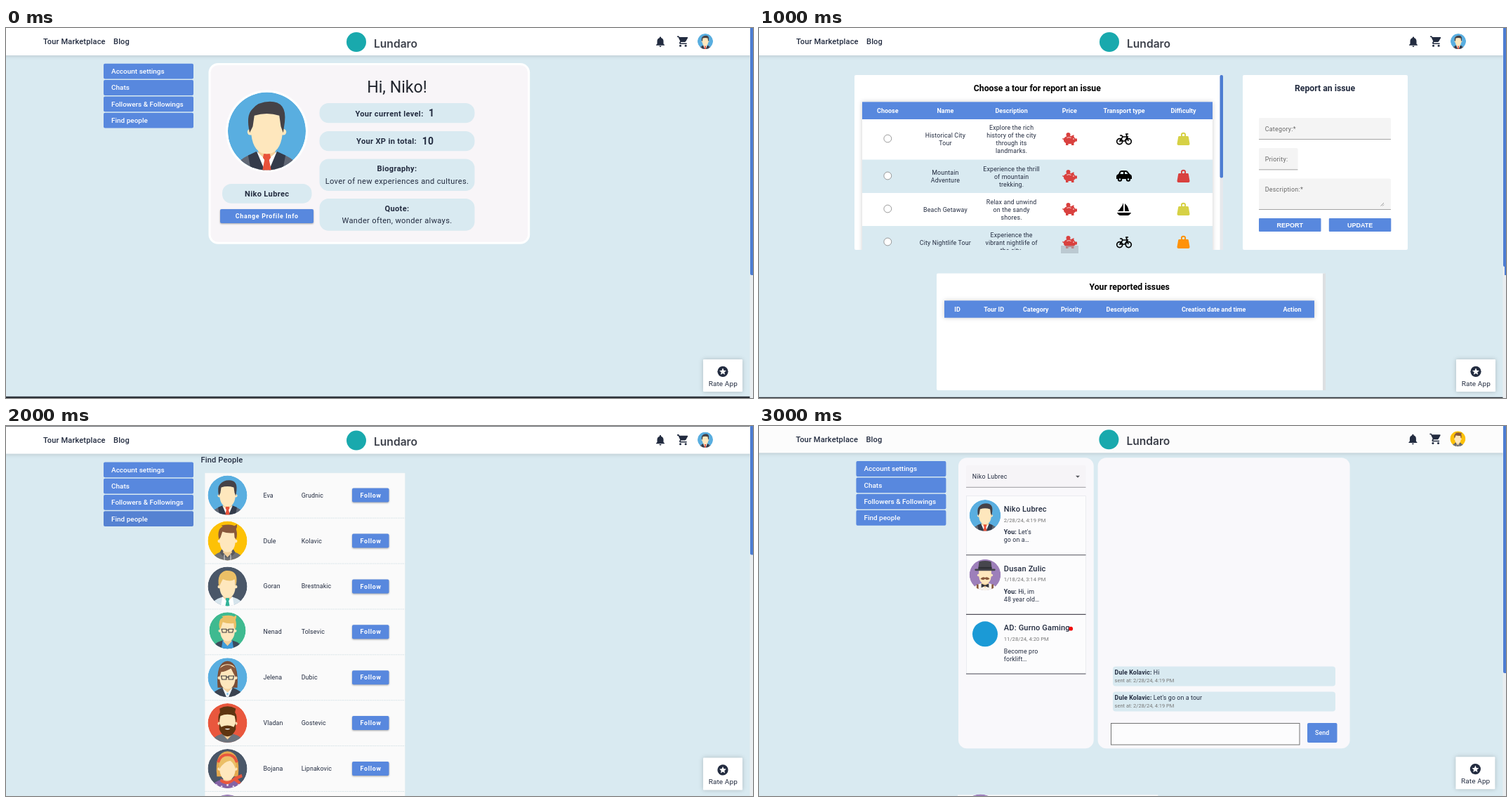
An HTML page that plays this animation: 1064 by 527 pixels, repeating every 4000 ms.

```html
<!DOCTYPE html>
<html lang="en">
<head>
<meta charset="utf-8">
<title>Tour app</title>
<style>
html, body { margin: 0; width: 100%; height: 100%; overflow: hidden; background: #d9eaf1; }
svg { display: block; width: 1064px; height: 527px; font-family: Roboto, sans-serif; }
text { white-space: pre; }
.mid { text-anchor: middle; }
.soft { filter: drop-shadow(0 0 3px #0003); }
.low { filter: drop-shadow(0 1px 1px #0005); }
</style>
</head>
<body>
<svg id="stage" viewBox="0 0 1064 527"></svg>
<script>
const INK = '#232c40', BLUE = '#5888de', PALE = '#d9eaf1', SKIN = '#fee7bd', RED = '#d9413f';
const ME = 'Niko Lubrec', PAL = 'Dule Kolavic';

const rect = (x, y, x2, y2, fill, rx = 0, more = '') =>
  `<rect x="${x}" y="${y}" width="${x2 - x}" height="${y2 - y}" rx="${rx}" fill="${fill}" ${more}/>`;
const circle = (x, y, r, fill, more = '') => `<circle cx="${x}" cy="${y}" r="${r}" fill="${fill}" ${more}/>`;
const path = (d, fill, more = '') => `<path d="${d}" fill="${fill}" ${more}/>`;
const line = (d, stroke, width = 1, more = '') => path(d, 'none', `stroke="${stroke}" stroke-width="${width}" ${more}`);
const move = (x, y, s, body) => `<g transform="translate(${x} ${y}) scale(${s})">${body}</g>`;
const text = (x, y, s, size = 8.86, weight = 400, fill = INK, ls = 0.0125, more = '') =>
  `<text x="${x}" y="${y}" font-size="${size}" font-weight="${weight}" fill="${fill}" letter-spacing="${ls * size}" ${more}>${s}</text>`;
const mid = (x, y, s, size, weight, fill, ls, more = '') => text(x, y, s, size, weight, fill, ls, 'class="mid" ' + more);
const lines = (x, y, list) => list.map((s, i) => mid(x, y + i * 11, s, 8.86, 400, INK, 0.0178)).join('');

// Avatars, drawn in a disc of radius 50
const HEAD = 'M-20-16Q-20-34 0-34T20-16V4Q17 29 0 29T-20 4Z';
const body = fill => path('M-42 52Q-40 35-13 27L0 31 13 27Q40 35 42 52Z', fill);
const face = circle(-21, 1, 4, SKIN) + circle(21, 1, 4, SKIN) + path(HEAD, SKIN);
const neck = path('M-11 18H11V30L0 42-11 30Z', '#f3cf99');
const shirt = fill => path('M-13 26L0 38 13 26 17 52H-17Z', fill);
const tie = fill => path('M-4 29H4L5 34 3 37 6 52H-6L-3 37-5 34Z', fill);
const lapels = fill => path('M-13 26L-2 52H-20L-24 31ZM13 26L2 52H20L24 31Z', fill);
const glasses = line('M-16-4H-3V5H-14ZM16-4H3V5H14ZM-3-1H3', '#3c3c40', 2);
const quiff = fill => path('M-22-4Q-27-30-12-36L-16-39Q8-44 18-38L24-42Q25-34 22-30 26-16 22-4L18-8 17-20Q0-18-13-23L-18-8Z', fill);

const people = [
  ['#59aee0', body('#616774') + neck + shirt('#fff') + lapels('#343b4a') + tie('#e9523a') + face +
    path('M-22 2Q-27-20-19-28-11-38 4-38 26-38 23-12L21 2 18-6 16-20Q0-25-16-20L-18-6Z', '#454247')],
  ['#fdc106', body('#717276') + path('M-20 30Q0 56 20 30L15 22H-15Z', '#595a5f') + neck + face +
    quiff('#88583b') + line('M-8 35V49M8 35V49', '#ddd', 2)],
  ['#4a5768', body('#d5e4ec') + neck + shirt('#fff') + tie('#32b398') + face +
    path('M-22 0Q-28-34-4-40 26-42 23-12L21 0 18-18Q8-10-12-18L-18-6Z', '#ebbf66')],
  ['#3fba90', body('#3e4b5d') + shirt('#409cda') + neck + face + quiff('#ebbf66') + glasses],
  ['#59aee0', path('M-25 26Q-30-40 0-42 30-40 25 26Z', '#7a4d35') + body('#3c4350') + neck + shirt('#eef4f8') + lapels('#3c4350') +
    face + path('M-21 0V-22Q0-42 21-22V0Q16-8 9-23-6-14-16-14Z', '#88583b') + glasses + circle(0, 42, 2, '#59aee0')],
  ['#e9573d', body('#6c737c') + neck + face + path('M-22 0Q-26-18-19-27L-20-37Q0-48 21-37L19-27Q26-18 22 0L18-18Q0-26-18-18Z', '#5f3511') +
    path('M-21 0L-16 10Q0 2 16 10L21 0V16Q14 34 0 34T-21 16Z', '#5f3511') + path('M-7 14H7Q0 20-7 14', '#fff')],
  ['#4a5768', path('M-27 20Q-34-42 0-44 34-42 27 20Z', '#e3a94e') + body('#8562a5') + neck + face +
    path('M-21 2Q-26-30 0-32 26-30 21 2 16-14 7-20-10-18-21 2', '#ebbf66') + line('M-24-16Q-18-35 0-35T24-16', '#e9573d', 7) +
    path('M-17 25Q0 40 17 22L36 14 38 22 26 27 35 36 28 39 17 31Q0 47-19 33Z', '#e9573d') +
    [-28, -15, 0, 15, 28].map((x, i) => circle(x, 42 + i % 2 * 4, 2.5, '#e9dff0')).join('')],
  ['#9d7fba', body('#f6f2ea') + neck + face + line('M-24 30V52M24 30V52', '#8a5a3c', 6) + path('M-22-18L-19-42Q0-48 19-42L22-18Z', '#46464d') +
    rect(-21, -25, 21, -18, '#2f3036') + rect(-33, -19, 33, -13, '#46464d', 3) +
    path('M0 9Q-8 4-15 13-5 19 0 13 5 19 15 13 8 4 0 9', '#8a5a3c') + path('M-12 28L0 33 12 28V41L0 36-12 41Z', '#35363d')]
];
const avatar = (k, x, y, r) => move(x, y, r / 50, `<g clip-path="url(#disc)">${circle(0, 0, 50, people[k][0]) + people[k][1]}</g>`);

// Icons
const BELL = 'M12 22c1.1 0 2-.9 2-2h-4c0 1.1.9 2 2 2zm6-6v-5c0-3.1-1.6-5.6-4.5-6.3V4c0-.8-.7-1.5-1.5-1.5s-1.5.7-1.5 1.5v.7C7.6 5.4 6 7.9 6 11v5l-2 2v1h16v-1z';
const CART = 'M1 2V4H3L6.6 11.6 5.2 14Q4.5 17 7 17H19V15H7.4L8.1 13H15.5Q16.8 13 17.3 12L21 5.4Q21.4 4 20 4H5.2L4.3 2Z';
const STAR = 'M0-5L1.5-1.6 5-1.3 2.3 1 3.1 4.5 0 2.6-3.1 4.5-2.3 1-5-1.3-1.5-1.6Z';

const pig = circle(-2, -6, 3, RED) +
  path('M-8-1Q-5-5 2-4L6-6V-3Q7-2 8-.5H10.5V3.5H8.5Q7 5 6 5.6V9H2.5V7H-2V9H-5.500V6Q-9 4-8.500 1Q-11 1-10-1.500Q-9.500 0-8-1Z', RED) +
  line('M-4-1.6Q-1-3 2-1.600', '#fff', 0.8) + circle(5.5, 0, 0.8, '#fff');
const rides = {
  bike: line('M-6 3L-2-3H5L1 3ZM-6 3H1M-3-5H-6M-2-3L-3.500-5M6 3L3-7H6', '#000', 1.7) +
    circle(-6.3, 3.6, 4, 'none', 'stroke="#000" stroke-width="1.700"') + circle(6.3, 3.6, 4, 'none', 'stroke="#000" stroke-width="1.700"'),
  car: path('M-11 0Q-11-2-8-3L-6-7Q-5-8-3-8H2Q4-8 5-7L8-3Q11-2 11 1V4H-11Z', '#000') + circle(-6, 4.5, 3.2, '#000') +
    circle(6, 4.5, 3.2, '#000') + path('M-5.500-3L-4.500-6H-1V-3ZM1-3V-6H3L5.500-3Z', PALE) + circle(-6, 4.5, 1.2, PALE) + circle(6, 4.5, 1.2, PALE),
  boat: path('M-1-9V3H-9Q-3-3-1-9ZM1-8Q6-4 7 3H1ZM-10 5H10Q8 9 5 9H-5Q-8 9-10 5Z', '#000')
};
const weight = fill => path('M-6-4H6Q7-4 7.300-3L9 7Q9 9 7 9H-7Q-9 9-9 7L-7.300-3Q-7-4-6-4Z', fill) +
  circle(0, -5.5, 2.7, 'none', `stroke="${fill}" stroke-width="1.900"`);

// Shared page parts
const header = (who, fill = '#fff') => rect(-5, -5, 1070, 39, fill, 0, 'class="soft"') +
  text(53, 23.4, 'Tour Marketplace', 11.08, 500) + text(153, 23.4, 'Blog', 11.08, 500) +
  circle(499, 20, 14, '#19a9ad') +
  text(524, 27.5, 'Lundaro', 15.6, 600, '#3b3f49', 0, 'font-family="Inter, sans-serif"') +
  move(923, 10.5, 0.75, path(BELL, INK)) +
  move(955.2, 10, 0.76, path(CART, INK) + circle(7, 20, 2, INK) + circle(17, 20, 2, INK)) + avatar(who, 996, 19, 11);
const menu = (active = -1) => ['Account settings', 'Chats', 'Followers &amp; Followings', 'Find people'].map((s, i) => {
  const y = 50.8 + i * 23.3;
  return rect(139, y, 267, y + 21.8, i === active ? '#5582d2' : BLUE, 2) + text(150, y + 14.3, s, 9.97, 500, '#fff', 0);
}).join('');
const rate = rect(993, 472, 1049, 518, '#fff', 1, 'class="soft"') + circle(1021, 489.3, 7.6, INK) + move(1021, 489.3, 1, path(STAR, '#fff')) +
  mid(1021.3, 509.8, 'Rate App', 9.97);
const bar = end => rect(1059.5, 0, 1064, 527, '#e9edf0') + rect(1060, -4, 1066, end, '#4d7dd2', 2);
const button = (x, y, x2, y2, s) => rect(x, y, x2, y2, BLUE, 2, 'class="low"') +
  mid((x + x2) / 2 + 0.3, (y + y2) / 2 + 3.1, s, 8.86, 700, '#fff', 0.078);

function profile() {
  const pill = (y, y2) => rect(446.5, y, 667.5, y2, PALE, 13);
  const bold = (x, y, s) => mid(x, y, s, 11.08, 700, INK, 0.03);
  const plain = (y, s) => mid(557, y, s, 11.08, 400, INK, 0.03125);
  return header(0) + menu() +
    rect(290, 51.5, 744.7, 306.3, '#f8f5f8', 12, 'stroke="#fff" stroke-width="3"') +
    circle(371.5, 147, 58.5, '#fff') + avatar(0, 371.5, 147, 55.5) +
    rect(308, 222, 435.5, 249.7, PALE, 13) + bold(371.7, 240, ME) + button(305, 258, 438, 278, 'Change Profile Info') +
    mid(557, 92, 'Hi, Niko!', 23.2, 400, '#20242c', 0) +
    pill(107, 135.3) + bold(546, 125.5, 'Your current level:') + mid(606, 126, '1', 13.9, 700) +
    pill(147, 175.3) + bold(542, 165.2, 'Your XP in total:') + mid(601, 165.7, '10', 13.9, 700) +
    pill(186.5, 232) + bold(557, 204.2, 'Biography:') + plain(221.7, 'Lover of new experiences and cultures.') +
    pill(243, 288.8) + bold(557, 260.9, 'Quote:') + plain(278.4, 'Wander often, wonder always.') +
    rect(0, 524.8, 1060, 527, '#2b3138') + bar(352) + rate;
}

function issues() {
  const title = (x, y, s, fill = '#000') => mid(x, y, s, 12.25, 700, fill, 0);
  const heads = (y, list) => list.map(([x, s]) => mid(x, y, s, 8.98, 700, '#fff', 0)).join('');
  const field = (y, x2, y2, s) => rect(712, y, x2, y2, '#f4f4f4', 2) + line(`M712 ${y2}H${x2}`, '#8f8f8f', 0.8) +
    text(720.7, y + 18.5, s, 8.86, 400, '#686868', 0.03125);
  const action = (x, s) => rect(x, 271, x + 88.5, 290, BLUE, 1) +
    mid(x + 44.3, 283.6, s, 9, 700, '#fff', 0, 'font-family="Liberation Sans, Arial, sans-serif"');
  const rows = [
    [130, 187.5, 158, 'bike', '#d6d145', ['Historical City', 'Tour'], ['Explore the rich', 'history of the city', 'through its', 'landmarks.']],
    [187.5, 235, 211, 'car', RED, ['Mountain', 'Adventure'], ['Experience the thrill', 'of mountain', 'trekking.']],
    [235, 282, 258, 'boat', '#d6d145', ['Beach Getaway'], ['Relax and unwind', 'on the sandy', 'shores.']],
    [282, 330, 305, 'bike', '#ff9208', ['City Nightlife Tour'], ['Experience the', 'vibrant nightlife of', 'the city.']]
  ].map(([y, y2, c, ride, tone, name, about], i) => rect(147, y, 646, y2, i % 2 ? PALE : '#fff') +
    circle(183.3, c - 0.5, 5.4, '#fff', 'stroke="#808080" stroke-width=".8"') +
    lines(265.4, c + 3.6 - (name.length - 1) * 5.5, name) + lines(359.6, c + 3.5 - (about.length - 1) * 5.5, about) +
    move(442.5, c, 1, pig) + move(520, c, 1, rides[ride]) + move(604.5, c, 1, weight(tone))).join('');
  return header(0) +
    rect(136, 67, 661, 316, '#fff', 2) + title(396.3, 90, 'Choose a tour for report an issue') +
    `<g clip-path="url(#table)"><g class="soft">${rect(147, 105.3, 646, 340, '#fff')}</g>${rect(147, 105.3, 646, 130, BLUE)}${rows}</g>` +
    heads(120.8, [[183.3, 'Choose'], [265.4, 'Name'], [359.6, 'Description'], [442.3, 'Price'], [520, 'Transport type'], [604.5, 'Difficulty']]) +
    rect(656.5, 67, 661, 316, '#e6e8ec') + rect(656.5, 67, 661, 213.5, '#4d7dd2', 2) +
    rect(430, 310, 455, 321, '#a9b4bc', 0, 'opacity=".6"') +
    rect(689, 67, 924, 316, '#fff', 2) + title(806, 90, 'Report an issue', INK) +
    field(128, 900, 158.5, 'Category:*') + field(171, 767.5, 201.8, 'Priority:') + field(214.5, 900, 258.5, 'Description:*') +
    line('M885.500 253.500L890 249M888 253.500L890 251.500', '#777', 0.7) + action(712, 'REPORT') + action(811.8, 'UPDATE') +
    rect(253, 349.5, 807, 516, '#fff', 2) + rect(803, 349.5, 807, 516, '#dcdfe2') + title(527.7, 373, 'Your reported issues') +
    rect(264, 388.3, 791, 412.7, BLUE, 0, 'class="soft"') +
    heads(403.6, [[282.6, 'ID'], [334.7, 'Tour ID'], [394.3, 'Category'], [444.8, 'Priority'], [517.7, 'Description'], [647.7, 'Creation date and time'], [759.5, 'Action']]) +
    rect(0, 525.8, 1060, 527, '#2b3138') + bar(340) + rect(1062, 338, 1064, 352, '#4d7dd2') + rate;
}

function find() {
  const names = ['Eva Grudnic', PAL, 'Goran Brestnakic', 'Nenad Tolsevic', 'Jelena Dubic', 'Vladan Gostevic', 'Bojana Lipnakovic'];
  const list = names.map((name, i) => {
    const y = 98.6 + i * 64.9, [first, last] = name.split(' ');
    return avatar(i, 315.5, i === 3 ? y - 2 : y, i === 3 ? 26 : 28) + text(366.5, y + 3, first) + text(420.7, y + 3, last) +
      button(493, y - 10, 545.5, y + 10, 'Follow') + line(`M283 ${y + 32.5}H568.500`, '#d3e0e5', 1, 'stroke-dasharray="1.500 1"');
  }).join('');
  return move(0, 0.6, 1, header(0) + menu(3)) + rect(0, 0, 1060, 0.8, '#4a4f56') + text(277.5, 52.2, 'Find People', 11.08, 500) +
    rect(283.2, 67, 568.3, 530, '#fafafa', 0, 'stroke="#e6edf0" stroke-width=".5"') + list + avatar(7, 315.5, 552.9, 28) +
    bar(183.5) + move(0, 0.6, 1, rate);
}

function chats() {
  const panel = (x, x2) => rect(x, 45.3, x2, 459.3, '#f9f8fb', 12);
  const GREY = '#777';
  const list = [
    [ME, '2/28/24, 4:19 PM', 'You:', " Let's", 'go on a…'],
    ['Dusan Zulic', '1/18/24, 3:14 PM', 'You:', ' Hi, im', '48 year old…'],
    ['AD: Gurno Gaming', '11/28/24, 4:20 PM', '', 'Become pro', 'forklift…']
  ].map(([name, date, who, first, second], i) => {
    const y = i * 84.6;
    return text(348.8, 122 + y, name, 11.08, 500) + text(348.8, 136.5 + y, date, 7.7, 400, GREY, 0) +
      text(348.8, 154.4 + y, `<tspan font-weight="700">${who}</tspan>${first}`) + text(348.8, 165.4 + y, second) +
      line(`M295 ${183.8 + y}H465.500`, '#514f5a', 1.1);
  }).join('');
  const message = (y, s) => rect(504, y, 821, y + 28, PALE, 4) +
    text(506.6, y + 11.4, `<tspan font-weight="700">${PAL}:</tspan> ${s}`) +
    text(506.6, y + 22.3, 'sent at: 2/28/24, 4:19 PM', 7.5, 400, GREY, 0);
  return move(-0.6, -0.7, 1, header(1, '#fcfcfc') + menu()) + panel(284, 476.7) + panel(482.6, 841.6) +
    rect(295, 56, 465.5, 87, '#f6f4f7', 2) + line('M295 87.300H465.500', '#858389', 0.8) +
    text(303.8, 75, ME, 8.86, 400, INK, 0.03) + path('M451 70.700H457L454 73.800Z', '#55565c') +
    rect(295.3, 99.7, 465.3, 353, '#fcfcfd', 0, 'stroke="#dfe3e8" stroke-width=".6"') + list +
    avatar(0, 322, 127.3, 22.3) + avatar(7, 322, 212, 22.3) + circle(322, 296.3, 18, '#1b9ad6') + circle(444.2, 288.7, 2.9, '#f00b0b') +
    message(342.5, 'Hi') + message(378.5, "Let's go on a tour") +
    rect(501.5, 423.5, 770, 454, '#fcfcfd', 0, 'stroke="#666" stroke-width=".9"') +
    rect(781, 423, 823.5, 451, BLUE, 2) + mid(802.2, 440.3, 'Send', 8.86, 500, '#fff') +
    rect(283, 525.4, 568.3, 527, '#fafafa') + avatar(7, 315.5, 552.4, 28) + bar(352) + move(-0.6, -0.7, 1, rate);
}

const stage = document.getElementById('stage');
stage.innerHTML = '<defs><clipPath id="disc"><circle r="50"/></clipPath><clipPath id="table"><path d="M136 95H656.500V316H136Z"/></clipPath></defs>' +
  [profile, issues, find, chats].map(scene => `<g class="scene">${scene()}</g>`).join('');
const scenes = stage.querySelectorAll('.scene');

function draw(now) {
  const current = Math.floor(now % 4000 / 1000);
  scenes.forEach((scene, i) => { scene.style.display = i === current ? '' : 'none'; });
}
function tick() {
  draw(performance.now());
  requestAnimationFrame(tick);
}
tick();
</script>
</body>
</html>
```
